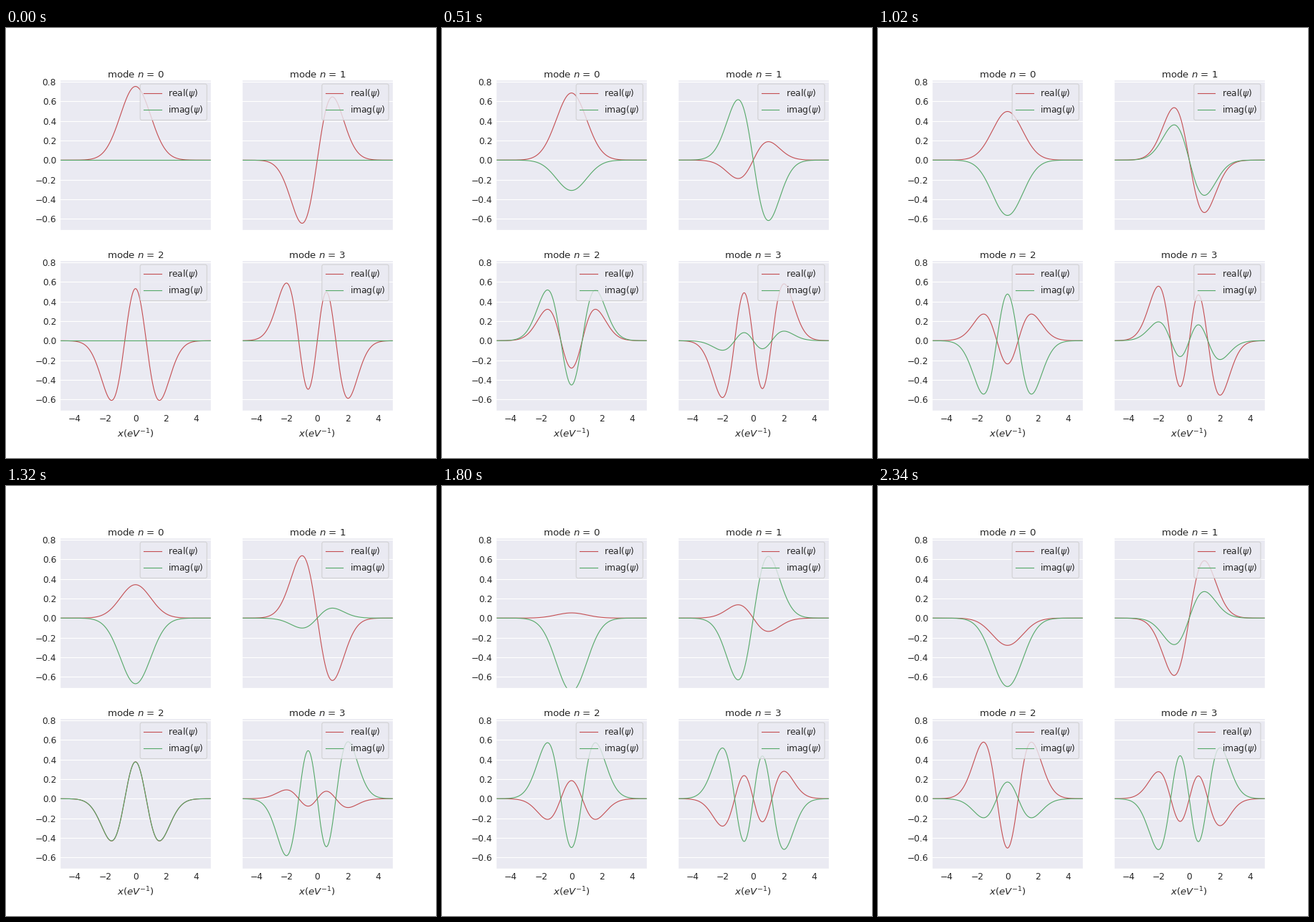
A matplotlib script for the animation above (2.37 s loop, 600 by 600 pixels).

```python
import math

import matplotlib.pyplot as plt
import numpy as np
from matplotlib.animation import FuncAnimation
from matplotlib.lines import Line2D
from matplotlib.patches import FancyBboxPatch
from matplotlib.transforms import Affine2D
from numpy.polynomial.hermite import hermval

FRAMES, INTERVAL = 79, 30
DT = 0.05                      # oscillator time per frame, with omega = 1
RED, GREEN, PANEL, INK = "#C44E52", "#55A868", "#EAEAF2", "#262626"
LINE_WIDTH = 0.8
SIGNS = (1, 1, -1, -1)         # overall sign of each eigenfunction

plt.rcParams.update({
    "font.family": "DejaVu Sans",
    "text.color": INK,
    "axes.labelcolor": INK,
    "xtick.color": INK,
    "ytick.color": INK,
    "axes.facecolor": PANEL,
    "axes.edgecolor": "white",
    "axes.linewidth": 1.0,
    "axes.axisbelow": True,
    "axes.titlesize": 9.6,
    "axes.labelsize": 9.6,
    "xtick.labelsize": 8.8,
    "ytick.labelsize": 8.8,
    "xtick.major.size": 0,
    "ytick.major.size": 0,
})


def eigenfunction(n, x):
    """Normalised harmonic oscillator state n."""
    norm = math.sqrt(2 ** n * math.factorial(n) * math.sqrt(math.pi))
    return SIGNS[n] * hermval(x, [0] * n + [1]) * np.exp(-x ** 2 / 2) / norm


def add_legend(ax):
    """Translucent key, laid out in pixels from the panel's top left corner."""
    px = Affine2D().translate(ax.bbox.x0, ax.bbox.y1)
    ax.add_artist(FancyBboxPatch(
        (112.2, -56.5), 93.1, 50.4, boxstyle="round,pad=0,rounding_size=2.4",
        facecolor=PANEL, edgecolor="0.8", alpha=0.8, linewidth=0.8,
        transform=px, zorder=5))
    rows = ((-19, RED, r"real($\psi$)"), (-42, GREEN, r"imag($\psi$)"))
    for y, color, label in rows:
        ax.add_artist(Line2D([117.1, 141.5], [y, y], color=color,
                             linewidth=LINE_WIDTH, transform=px, zorder=6))
        ax.text(151.3, y - 4.3, label, fontsize=8.8, transform=px, zorder=6)


x = np.linspace(-5, 5, 500)
states = [eigenfunction(n, x) for n in range(4)]
low, high = states[1].min(), states[0].max()
margin = 0.05 * (high - low)

fig, axes = plt.subplots(2, 2, figsize=(6, 6), dpi=100, sharex=True, sharey=True)
fig.subplots_adjust(left=0.125, right=0.9, bottom=0.11, top=0.88,
                    wspace=0.2, hspace=0.2)
fig.set_facecolor("white")

curves = []
for n, ax in enumerate(axes.flat):
    ax.set_xlim(-5, 5)
    ax.set_ylim(low - margin, high + margin)
    ax.set_xticks(range(-4, 5, 2))
    ax.set_yticks(np.arange(-3, 5) / 5)
    ax.grid(axis="y", color="white", linewidth=0.8)
    ax.set_title(f"mode $n$ = {n}", pad=2)
    real, = ax.plot(x, states[n], color=RED, linewidth=LINE_WIDTH)
    imag, = ax.plot(x, 0 * x, color=GREEN, linewidth=LINE_WIDTH)
    curves.append((real, imag))
    add_legend(ax)
for ax in axes[1]:
    ax.set_xlabel(r"$x (eV^{-1})$")


def update(frame):
    for n, (real, imag) in enumerate(curves):
        phase = (n + 0.5) * DT * frame
        real.set_ydata(states[n] * math.cos(phase))
        imag.set_ydata(-states[n] * math.sin(phase))
    return [line for pair in curves for line in pair]


anim = FuncAnimation(fig, update, frames=FRAMES, interval=INTERVAL,
                     repeat=True, repeat_delay=0)
plt.show()
```
